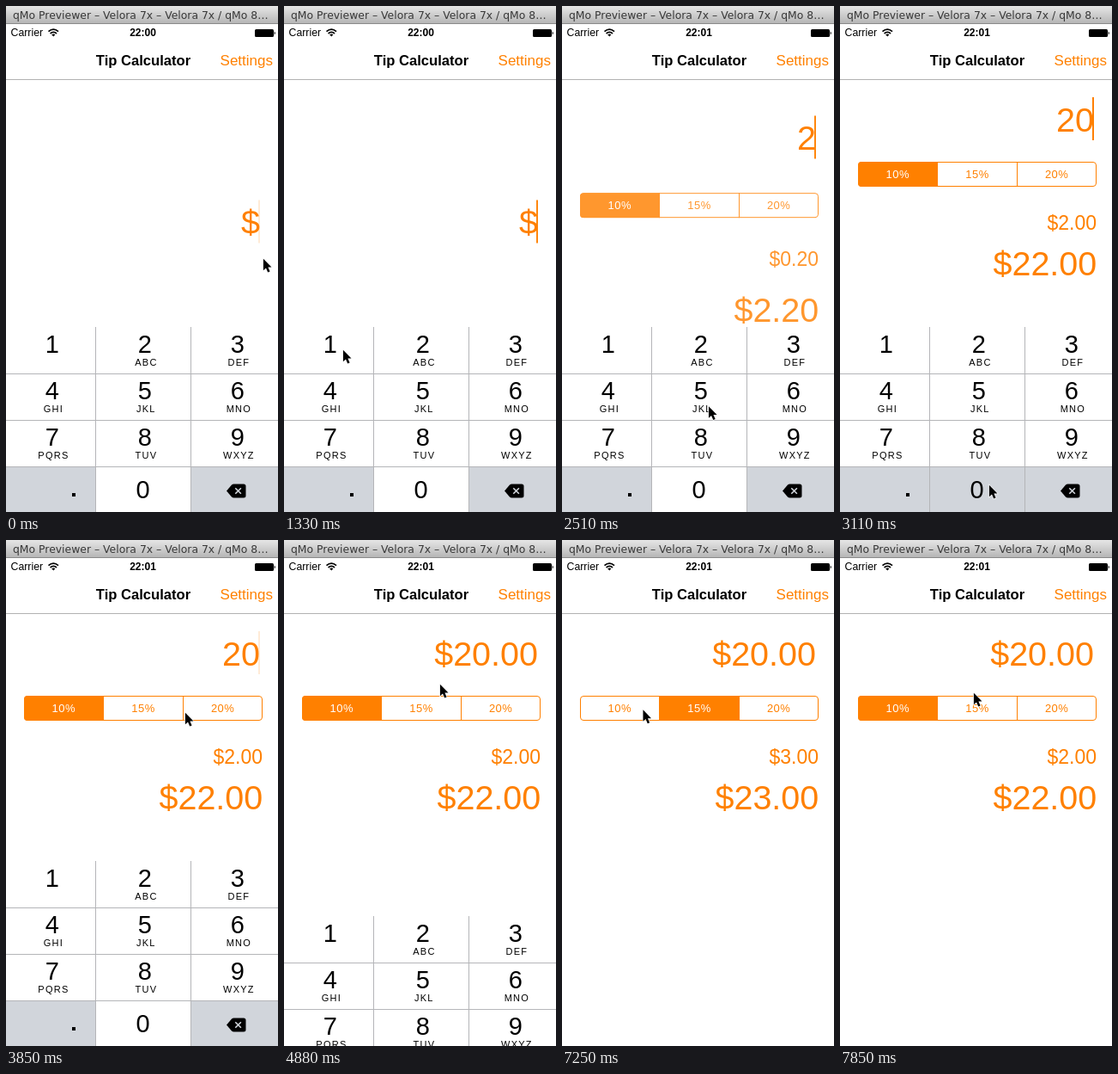
Recreate the animation shown at these times as an HTML page. Size 317 by 588 pixels, loop 8 s.

```html
<!DOCTYPE html>
<html lang="en">
<head>
<meta charset="utf-8">
<title>Tip Calculator</title>
<style>
  html, body { margin: 0; width: 100%; height: 100%; overflow: hidden; background: #fff; }
  svg { display: block; width: 100%; height: 100%; font-family: "Liberation Sans", Arial, sans-serif; }
  .mid { text-anchor: middle; }
  .end { text-anchor: end; }
  .orange { fill: #ff8000; }
  .bold { font-weight: bold; }
  .big { font-size: 39.5px; }
  .seg { font-size: 13px; letter-spacing: .5px; }
  .digit { font-size: 29px; }
  .abc { font-size: 11px; letter-spacing: 1.25px; }
  .bar { font-family: "DejaVu Sans", sans-serif; font-size: 12.4px; fill: #383838; }
</style>
</head>
<body>
<svg viewBox="0 0 317 588">
  <defs>
    <linearGradient id="chrome" x2="0" y2="1">
      <stop stop-color="#e6e6e6"/><stop offset="1" stop-color="#b6b6b6"/>
    </linearGradient>
    <clipPath id="rounded"><rect x="21" y="181" width="278" height="29" rx="4"/></clipPath>
  </defs>
  <rect width="317" height="588" fill="#fff"/>

  <g id="results">
    <g id="segments"></g>
    <text id="tip" class="end orange" x="299" y="260" font-size="23"></text>
    <text id="total" class="end orange big" x="299.3" y="313"></text>
  </g>
  <g id="entry">
    <text id="amount" class="end orange big" x="296" y="145.5"></text>
    <rect id="caret" class="orange" x="294" y="106" width="2" height="50"/>
  </g>

  <path d="M0 85.5H317" stroke="#b2b2b2"/>
  <text class="mid bold" x="160" y="69" font-size="16.6">Tip Calculator</text>
  <text class="end orange" x="311" y="69" font-size="17">Settings</text>
  <text x="5.5" y="35" font-size="12.3">Carrier</text>
  <text id="clock" class="mid bold" x="159.5" y="35" font-size="12"></text>
  <g fill="none" stroke="#000" stroke-width="1.7">
    <path d="M49.5 29.6Q55.3 24.6 61 29.6M51.6 32Q55.3 28.8 59 32"/>
    <path d="M53.2 33.2Q55.3 31.6 57.4 33.2L55.3 35.4Z" fill="#000" stroke="none"/>
  </g>
  <rect x="290" y="27" width="22" height="9" rx="1.5"/>
  <path d="M312.7 29.5Q315 31.5 312.7 33.5Z"/>
  <rect width="317" height="20" fill="url(#chrome)"/>
  <path d="M0 20.5H317" stroke="#8a8a8a"/>
  <text class="bar" x="8" y="15">qMo Previewer – Velora 7x – Velora 7x / qMo 8…</text>

  <g id="keyboard">
    <rect y="373" width="317" height="215" fill="#fff"/>
    <path d="M0 536H104V588H0ZM216 536H317V588H216Z" fill="#d1d5db"/>
    <rect id="press" width="110" height="53" x="105" fill="#d1d5db"/>
    <path d="M104.5 373V588M215.5 373V588M0 427.5H317M0 481.5H317M0 535.5H317" stroke="#b4b5b8" fill="none"/>
    <g id="keys"></g>
    <rect x="77" y="566" width="4" height="4"/>
    <path d="M257 563.5L263 556.5Q264 555.5 265.5 555.5H277Q279.5 555.5 279.5 558V569Q279.5 571.5 277 571.5H265.5Q264 571.5 263 570.5Z"/>
    <path d="M267.3 560.2L273.9 566.8M273.9 560.2L267.3 566.8" stroke="#d1d5db" stroke-width="1.6"/>
  </g>

  <g id="pointer">
    <path d="M.9 .8v13.5l3.1-2.8 2.2 5.1 2.4-1-2.2-5h4.1Z" stroke="#fff" stroke-width="1.2" paint-order="stroke"/>
  </g>
</svg>
<script>
const $ = id => document.getElementById(id);
const LOOP = 8000, STEPS = 54;

// Keyboard labels
const letters = ['', 'ABC', 'DEF', 'GHI', 'JKL', 'MNO', 'PQRS', 'TUV', 'WXYZ'];
$('keys').innerHTML = letters.map((abc, i) => {
  const x = 53.8 + 108 * (i % 3), y = 403 + 54 * Math.floor(i / 3);
  return `<text class="mid digit" x="${x}" y="${y}">${i + 1}</text>
    <text class="mid abc" x="${x + 1.6}" y="${y + 15}">${abc}</text>`;
}).join('') + '<text class="mid digit" x="159.5" y="572">0</text>';

// Segmented control
const cellWidth = 278 / 3;
$('segments').innerHTML = '<g clip-path="url(#rounded)">' + [10, 15, 20].map((percent, i) => {
  const x = 21 + i * cellWidth;
  return `<rect class="cell orange" x="${x}" y="181" width="${cellWidth}" height="29"/>
    <text class="label mid seg" x="${x + cellWidth / 2}" y="200">${percent}%</text>`;
}).join('') + `</g>
  <rect x="21.5" y="181.5" width="277" height="28" rx="3.5" fill="none" stroke="#ff8000"/>
  <path d="M113.5 181V210M206.5 181V210" stroke="#ff8000"/>`;
const cells = document.querySelectorAll('.cell');
const labels = document.querySelectorAll('.label');

const CLOCK = 10, TWO = 15, ZERO = 21, DONE = 32, PICK_15 = 43, PICK_10 = 51;

// Pointer trips: start, end, x, y
const trips = [
  [0, 1, 290, 314],
  [3, 9, 68, 399],
  [10, 14, 168, 400],
  [14.5, 20, 173, 556],
  [23, 26, 208, 200],
  [26, 30, 181, 167],
  [37, 41, 141, 195],
  [47, 50, 80, 197],
  [51, 53, 155, 177]
];

const clamp = v => Math.min(1, Math.max(0, v));
const ease = (k, from, to) => {
  const u = clamp((k - from) / (to - from));
  return u < .5 ? 2 * u * u : 1 - 2 * (1 - u) ** 2;
};
const shift = (id, x, y) => $(id).setAttribute('transform', `translate(${x} ${y})`);

function pointerAt(k) {
  let x = 299, y = 293;
  for (const [from, to, tx, ty] of trips) {
    const u = ease(k, from, to);
    x += (tx - x) * u;
    y += (ty - y) * u;
  }
  return [x, y];
}

// The blink starts afresh with every typed digit
function caretAt(k) {
  if (k >= DONE) return 0;
  const start = k >= ZERO ? ZERO : k >= TWO ? TWO : 1;
  return clamp(.55 + 1.2 * Math.cos((k - start - .82) / 6 * 2 * Math.PI));
}

function draw(k) {
  const reveal = ease(k, TWO - .1, TWO + 2.9), rest = 1 - reveal;
  const chosen = k >= PICK_15 && k < PICK_10 ? 1 : 0;
  const pressed = k === PICK_15 - 1 ? 1 : k === PICK_10 - 1 ? 0 : -1;
  const bill = k < TWO ? 0 : k < ZERO ? 2 : 20;
  const tip = bill * (chosen ? .15 : .1);

  $('clock').textContent = k < CLOCK ? '22:00' : '22:01';
  $('amount').textContent = k >= DONE ? '$' + bill.toFixed(2) : bill || '$';
  $('tip').textContent = '$' + tip.toFixed(2);
  $('total').textContent = '$' + (bill + tip).toFixed(2);

  $('results').setAttribute('opacity', reveal);
  shift('entry', 0, 119.5 * rest);
  shift('segments', 0, 201 * rest);
  shift('tip', 0, 234 * rest);
  shift('total', 0, 299 * rest);
  $('caret').setAttribute('opacity', caretAt(k));

  cells.forEach((cell, i) => {
    cell.setAttribute('opacity', i === chosen ? 1 : i === pressed ? .15 : 0);
    labels[i].setAttribute('fill', i === chosen ? '#fff' : '#ff8000');
  });

  const twoDown = k === TWO - 1, zeroDown = k === ZERO - 1 || k === ZERO;
  $('press').setAttribute('y', zeroDown ? 535 : 373);
  $('press').setAttribute('opacity', twoDown || zeroDown ? 1 : 0);
  shift('keyboard', 0, 216 * ease(k, DONE - .54, DONE + 3.46));
  shift('pointer', ...pointerAt(k));
}

function tick() {
  const t = performance.now() % LOOP;
  draw(Math.min(STEPS - 1, Math.floor(t / LOOP * STEPS + .1)));
  requestAnimationFrame(tick);
}
tick();
</script>
</body>
</html>
```
